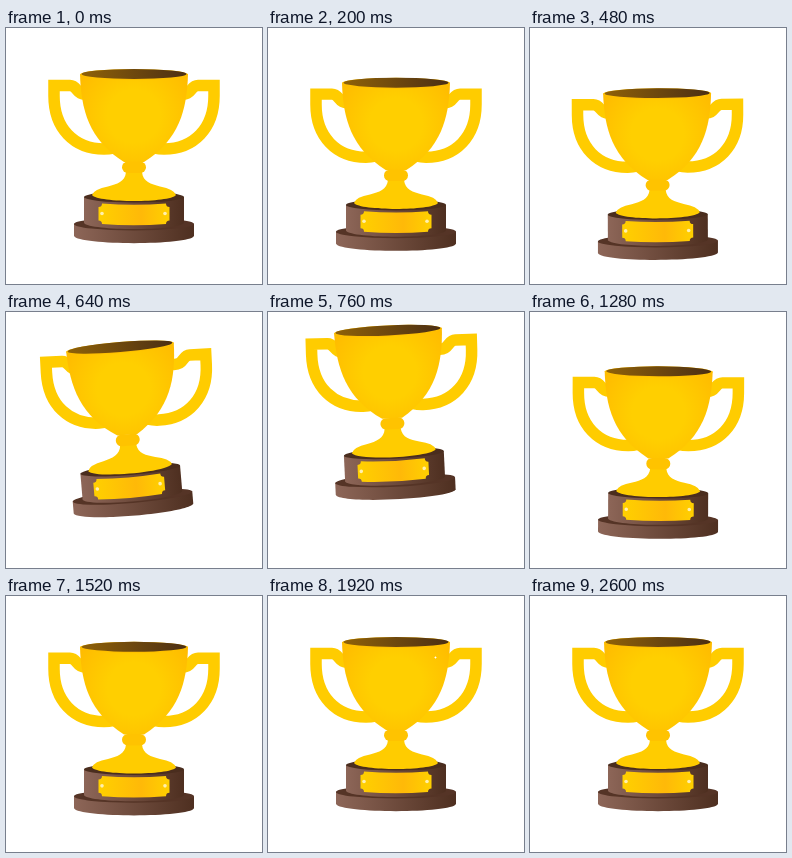
An HTML page that plays this animation: 256x256 px, repeating every 2.8 s.

```html
<!DOCTYPE html>
<html lang="en">
<head>
<meta charset="utf-8">
<title>Trophy</title>
<style>
  html, body { margin: 0; width: 100%; height: 100%; overflow: hidden; background: #fff; }
  svg { display: block; width: 100%; height: 100%; }
</style>
</head>
<body>
<svg viewBox="0 0 256 256">
  <defs>
    <radialGradient id="gold" gradientUnits="userSpaceOnUse" cx="128" cy="88" r="66">
      <stop offset=".4" stop-color="#ffcf00"/>
      <stop offset="1" stop-color="#ffbb00"/>
    </radialGradient>
    <linearGradient id="inside">
      <stop offset="0" stop-color="#8f6108"/>
      <stop offset="1" stop-color="#4c2f14"/>
    </linearGradient>
    <linearGradient id="wood">
      <stop offset="0" stop-color="#8d6658"/>
      <stop offset="1" stop-color="#4e2f20"/>
    </linearGradient>
    <linearGradient id="plate">
      <stop offset="0" stop-color="#ffd000"/>
      <stop offset=".6" stop-color="#ffb908"/>
      <stop offset="1" stop-color="#ffd000"/>
    </linearGradient>
  </defs>
  <g id="trophy">
    <g id="handles" fill="none" stroke="#ffcc00" stroke-width="11.500">
      <path id="handle" d="M82 66C70 68 72 57.500 64 57.500H48V68C48 100 68 121 98 121Q108 121 118 116"/>
      <use href="#handle" transform="matrix(-1 0 0 1 256 0)"/>
    </g>
    <path fill="url(#wood)" d="M68 196V208C72 217.500 184 217.500 188 208V196Z"/>
    <ellipse cx="128" cy="196" rx="60" ry="6.500" fill="#553426"/>
    <path fill="url(#wood)" d="M78 169V195C84 203 172 203 178 195V169Z"/>
    <ellipse cx="128" cy="169" rx="50" ry="5.500" fill="#4a2d1e"/>
    <path fill="#ffcc00" d="M120 144H136C137 154 145 156 154 158.500Q168 161 170 167C164 175 92 175 86 167Q88 161 102 158.500C111 156 119 154 120 144Z"/>
    <path fill="url(#gold)" d="M74 46C75 82 83 112 118 134H138C173 112 181 82 182 46Z"/>
    <rect x="116" y="133.500" width="24" height="11.500" rx="5.700" fill="#ffc300"/>
    <ellipse cx="128" cy="46.500" rx="54" ry="5.500" fill="#ffc000"/>
    <ellipse cx="128" cy="46" rx="52.500" ry="5" fill="url(#inside)"/>
    <g id="label">
      <path fill="url(#plate)" d="M96 175.500Q128 178 160 175.500Q160 179 163.500 179V192.500Q160 192.500 160 196Q128 198.500 96 196Q96 192.500 92.500 192.500V179Q96 179 96 175.500Z"/>
      <g fill="#fff0b0"><circle cx="96" cy="185.500" r="1.800"/><circle cx="159" cy="185.500" r="1.800"/></g>
    </g>
  </g>
  <path id="spark" fill="#fff" d="M0-17Q2-2 17 0Q2 2 0 17Q-2 2-17 0Q-2-2 0-17Z"/>
</svg>
<script>
const LOOP = 2800;
const wave = p => (1 - Math.cos(Math.PI * Math.min(1, Math.max(0, p)))) / 2;

// Swings from one turning point [ms, value] to the next, starting at rest
function swing(t, start, ...turns) {
  let value = 0, from = 0, begin = start;
  for (const [end, to] of turns) {
    value += (to - from) * wave((t - begin) / (end - begin));
    [begin, from] = [end, to];
  }
  return value;
}

const place = (id, transform) => document.getElementById(id).setAttribute('transform', transform);

function draw(now) {
  const t = now % LOOP;
  const drop = swing(t, 40, [420, 20], [790, -28.5], [1230, 12], [1720, 0]);
  const angle = swing(t, 450, [640, -4.8], [1000, 3.3], [1340, 0]);
  const squash = Math.max(0, drop) / 1200;
  place('trophy', `translate(128 ${214 + drop}) rotate(${angle}) scale(1 ${1 - squash}) translate(-128 -214)`);
  place('handles', `rotate(${-.4 * angle} 128 205)`);
  place('label', `translate(${.5 * angle} 0)`);
  place('spark', `translate(167.5 61.5) scale(${wave(2 * (t - 1850) / 750) - wave(2 * (t - 2225) / 750)})`);
  requestAnimationFrame(draw);
}
requestAnimationFrame(draw);
</script>
</body>
</html>
```
